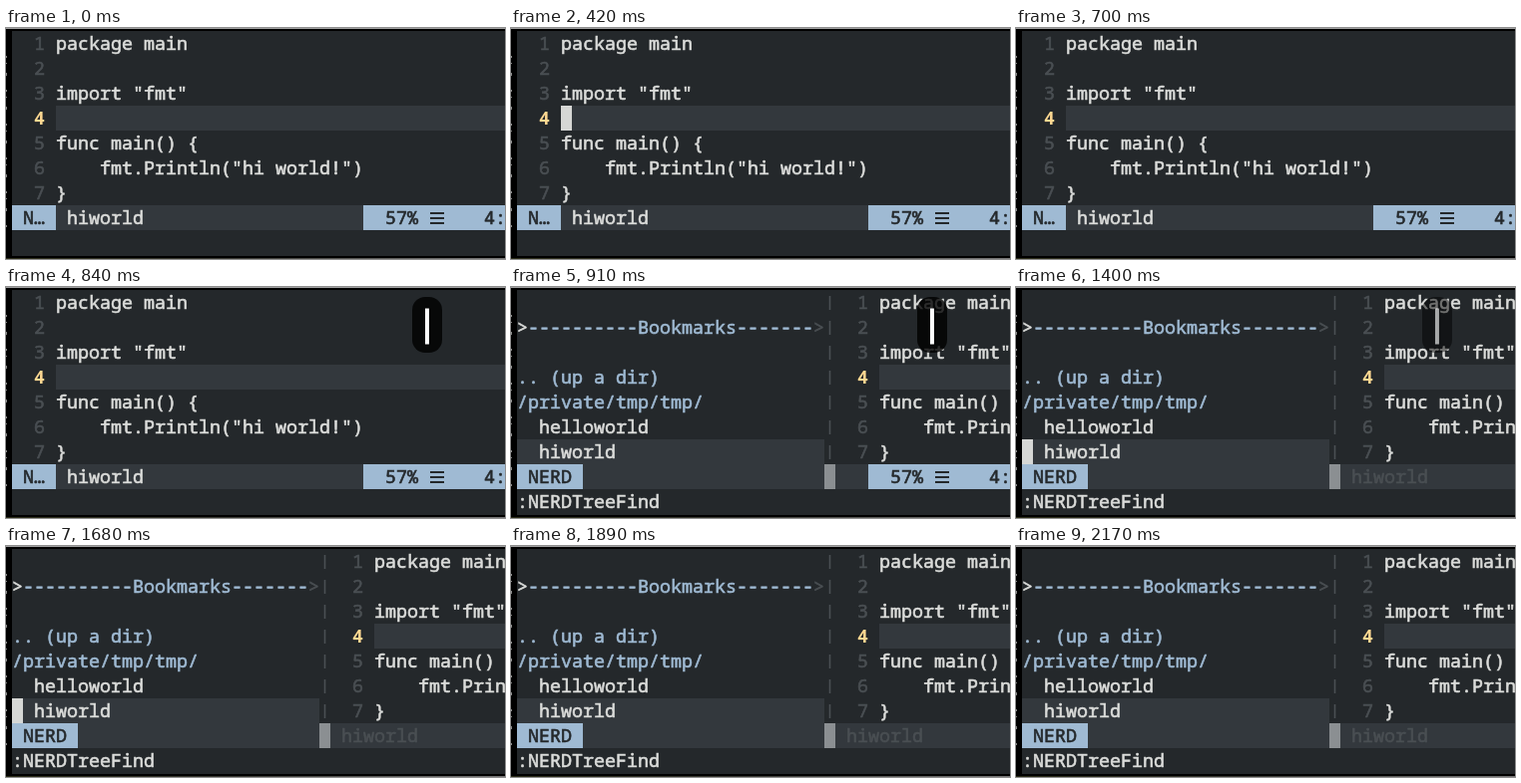
An HTML page for the animation above (2310 ms loop, 500 by 232 pixels).

```html
<!DOCTYPE html>
<html lang="en">
<head>
<meta charset="utf-8">
<title>File tree in a terminal editor</title>
<style>
  html, body { margin: 0; width: 100%; height: 100%; overflow: hidden; background: #000; }
  svg { display: block; width: 500px; height: 232px; color: #dcdddb; }
  text {
    font: 18.333px "Noto Sans Mono", monospace;
    fill: currentColor; stroke: currentColor; stroke-width: .6; white-space: pre;
  }
  tspan { fill: currentColor; stroke: currentColor; }
  rect { fill: currentColor; }
  .bg, .ink { color: #24282b; }
  .bar { color: #33383d; }
  .blue { color: #9fbad3; }
  .dim { color: #4a4f53; }
  .now { color: #ffd992; font-weight: 700; stroke: none; }
  .split { color: #8b8f92; }
  .cursor { color: #d6d7d5; }

  /* 33 ticks of 70 ms */
  .edit, .tree, .active, .passive, .cursor { animation: 2310ms step-end infinite; }
  .edit { animation-name: edit; }
  .tree { animation-name: tree; }
  .active { animation-name: active; }
  .passive { animation-name: passive; }
  .edit .cursor { animation-name: blink-edit; }
  .tree .cursor { animation-name: blink-tree; }
  .key { color: #000; animation: key 2310ms step-end infinite; }
  .key text { font: 36px "Liberation Sans", sans-serif; color: #fff; stroke-width: 1; }

  @keyframes edit { 0% { visibility: visible } 39.39%, 100% { visibility: hidden } }
  @keyframes tree { 0% { visibility: hidden } 39.39%, 100% { visibility: visible } }
  @keyframes active { 0% { opacity: 1 } 42.42%, 100% { opacity: 0 } }
  @keyframes passive { 0% { opacity: 0 } 42.42%, 100% { opacity: 1 } }
  @keyframes blink-edit { 0% { opacity: 0 } 3.03% { opacity: 1 } 27.27%, 100% { opacity: 0 } }
  @keyframes blink-tree { 0% { opacity: 0 } 51.51% { opacity: 1 } 78.78%, 100% { opacity: 0 } }
  @keyframes key {
    0% { opacity: 0 }
    36.36% { opacity: 1 }
    57.57% { opacity: 1; animation-timing-function: steps(5, start) }
    72.72%, 100% { opacity: 0 }
  }
</style>
</head>
<body>
<svg viewBox="0 0 500 232">
  <defs>
    <g id="code">
      <rect class="bar" x="50" y="78" width="450" height="25"/>
      <text class="dim" x="28" y="22">1</text>
      <text class="dim" x="28" y="47">2</text>
      <text class="dim" x="28" y="72">3</text>
      <text class="now" x="28" y="97">4</text>
      <text class="dim" x="28" y="122">5</text>
      <text class="dim" x="28" y="147">6</text>
      <text class="dim" x="28" y="172">7</text>
      <text x="50" y="22">package main</text>
      <text x="50" y="72">import "fmt"</text>
      <text x="50" y="122">func main() {</text>
      <text x="94" y="147">fmt.Println("hi world!")</text>
      <text x="50" y="172">}</text>
    </g>
    <g id="position">
      <rect class="blue" x="358" y="178" width="142" height="25"/>
      <text class="ink" x="380" y="197">57%</text>
      <path class="ink" d="M425 186h14M425 191h14M425 196h14" stroke="currentColor" stroke-width="2"/>
      <text class="ink" x="479" y="197">4:</text>
    </g>
    <linearGradient id="desk" gradientUnits="userSpaceOnUse" x1="0" x2="500" y1="0" y2="0">
      <stop offset="0" stop-color="#2b2c18"/>
      <stop offset=".45" stop-color="#3a3a34"/>
      <stop offset="1" stop-color="#777"/>
    </linearGradient>
  </defs>

  <path d="M0 .5H500" stroke="#a0a0a0"/>
  <path d="M.5 28V205" stroke="#888" stroke-dasharray="2 5 1 9 3 14"/>
  <path d="M0 231.5H500" stroke="url(#desk)"/>
  <rect class="bg" x="6" y="3" width="494" height="226"/>

  <g class="edit">
    <use href="#code"/>
    <rect class="cursor" x="50" y="78" width="11" height="25"/>
    <rect class="bar" x="6" y="178" width="494" height="25"/>
    <rect class="blue" x="6" y="178" width="44" height="25"/>
    <text class="ink" x="17" y="197">N…</text>
    <text x="61" y="197">hiworld</text>
    <use href="#position"/>
  </g>

  <g class="tree">
    <use href="#code" x="319"/>
    <path class="dim" d="M319.5 9V178" stroke="currentColor" stroke-width="1.6" stroke-dasharray="14 11"/>
    <text x="6" y="47">&gt;<tspan class="blue">----------Bookmarks-------</tspan><tspan class="dim">&gt;</tspan></text>
    <text class="blue" x="6" y="97">.. (up a dir)</text>
    <text class="blue" x="6" y="122">/private/tmp/tmp/</text>
    <text x="28" y="147">helloworld</text>
    <rect class="bar" x="6" y="153" width="308" height="25"/>
    <text x="28" y="172">hiworld</text>
    <rect class="cursor" x="6" y="153" width="11" height="25"/>

    <rect class="bar" x="6" y="178" width="494" height="25"/>
    <rect class="blue" x="6" y="178" width="66" height="25"/>
    <text class="ink" x="17" y="197">NERD</text>
    <rect class="split" x="314" y="178" width="11" height="25"/>
    <use class="active" href="#position"/>
    <g class="passive">
      <text class="dim" x="336" y="197">hiworld</text>
    </g>
    <text x="6" y="222">:NERDTreeFind</text>
  </g>

  <g class="key">
    <rect x="407" y="10" width="30" height="56" rx="13" fill-opacity=".8"/>
    <text x="422" y="49" text-anchor="middle">|</text>
  </g>
</svg>
</body>
</html>
```
